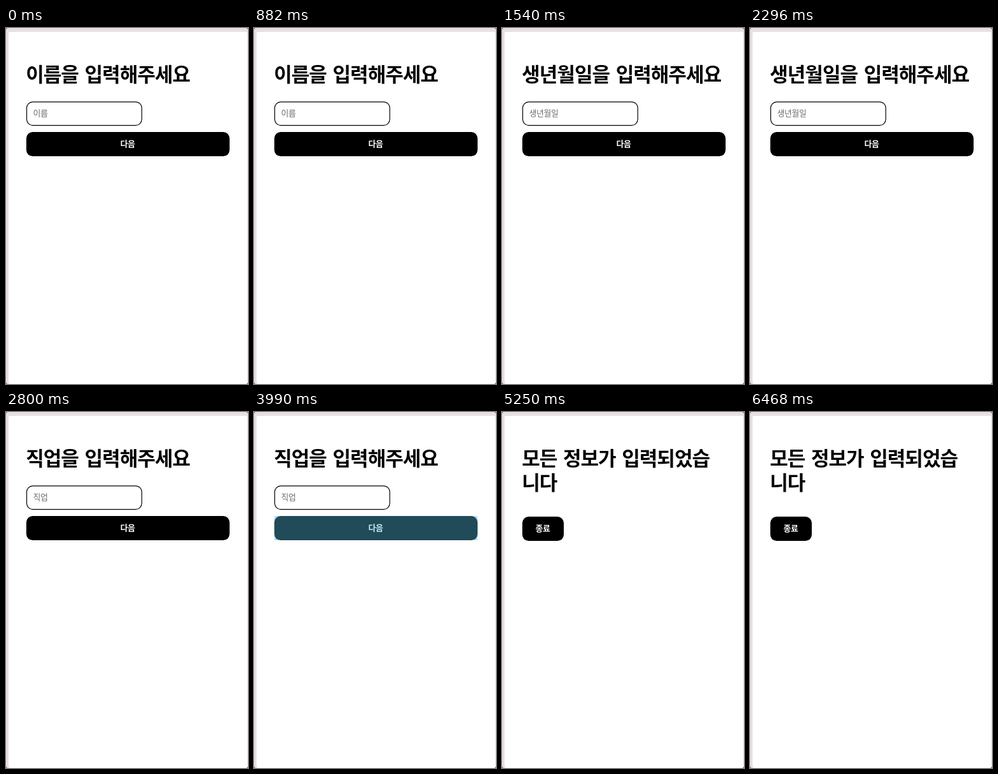
Animation, 380 px wide and 558 px high, one loop 7.28 s. Source, as an HTML page:

```html
<!DOCTYPE html>
<html lang="ko">
<head>
<meta charset="utf-8">
<title>입력 단계</title>
<style>
  html, body { margin: 0; width: 100%; height: 100%; overflow: hidden; background: #4a4346; }
  svg { display: block; width: 380px; height: 558px; }
  text { font-family: "Noto Sans CJK KR", "Noto Sans CJK", sans-serif; white-space: pre; }
  .title { font-size: 31px; font-weight: 700; letter-spacing: -.94px; word-spacing: 1.8px; }
  .hint { font-size: 12.9px; fill: #6c6c6c; letter-spacing: -.36px; }
  .label { font-size: 12.9px; font-weight: 700; fill: #fff; letter-spacing: -.36px; }
  .glow { visibility: hidden; fill: #b5e4f5; }
  .tap .glow { visibility: visible; }
  .tap .button { fill: #214b59; }
  .tap .label { fill: #c2ebf8; }
</style>
</head>
<body>
<svg viewBox="0 0 380 558">
  <rect width="380" height="558" rx="3" fill="#e8dfe2"/>
  <path d="M4 9a3 3 0 0 1 3-3H376a3 3 0 0 1 3 3V555a3 3 0 0 1-3 3H7a3 3 0 0 1-3-3Z" fill="#fff"/>
  <text class="title" x="31.2" y="83.5" id="line1"></text>
  <text class="title" x="31.2" y="121.9" id="line2"></text>
  <g id="field">
    <rect x="32.5" y="115.8" width="180.7" height="36.8" rx="9.5" fill="#fff" stroke="#000" stroke-width="1.2"/>
    <text class="hint" x="42.4" y="138" id="hint"></text>
  </g>
  <g id="action">
    <rect class="glow" x="32" y="163" width="319" height="38"/>
    <rect class="button" id="button" x="31.9" height="38.1" rx="10"/>
    <text class="label" id="label"></text>
  </g>
</svg>
<script>
  const LOOP = 7280;
  const $ = id => document.getElementById(id);
  const ask = (start, word, particle, tap = false) =>
    ({ start, lines: [`${word}${particle} 입력해주세요`, ''], hint: word, tap });

  const steps = [
    ask(0, '이름', '을'),
    ask(1470, '이름', '을', true),
    ask(1540, '생년월일', '을'),
    ask(2800, '직업', '을'),
    ask(3990, '직업', '을', true),
    ask(4060, '주소', '를'),
    { start: 5250, lines: ['모든 정보가 입력되었습', '니다'], hint: '', tap: false, done: true }
  ];

  function setButton(width, y, text, textX) {
    $('button').setAttribute('width', width);
    $('button').setAttribute('y', y);
    $('label').setAttribute('x', textX);
    $('label').setAttribute('y', y + 22.7);
    $('label').textContent = text;
  }

  let shown;
  function show(step) {
    if (step === shown) return;
    shown = step;
    $('line1').textContent = step.lines[0];
    $('line2').textContent = step.lines[1];
    $('hint').textContent = step.hint;
    $('field').style.display = step.done ? 'none' : '';
    $('action').classList.toggle('tap', step.tap);
    if (step.done) setButton(65.1, 164, '종료', 52.4);
    else setButton(319.2, 163, '다음', 179.5);
  }

  function tick() {
    const t = performance.now() % LOOP;
    show(steps.findLast(s => s.start <= t));
    requestAnimationFrame(tick);
  }
  tick();
</script>
</body>
</html>
```
